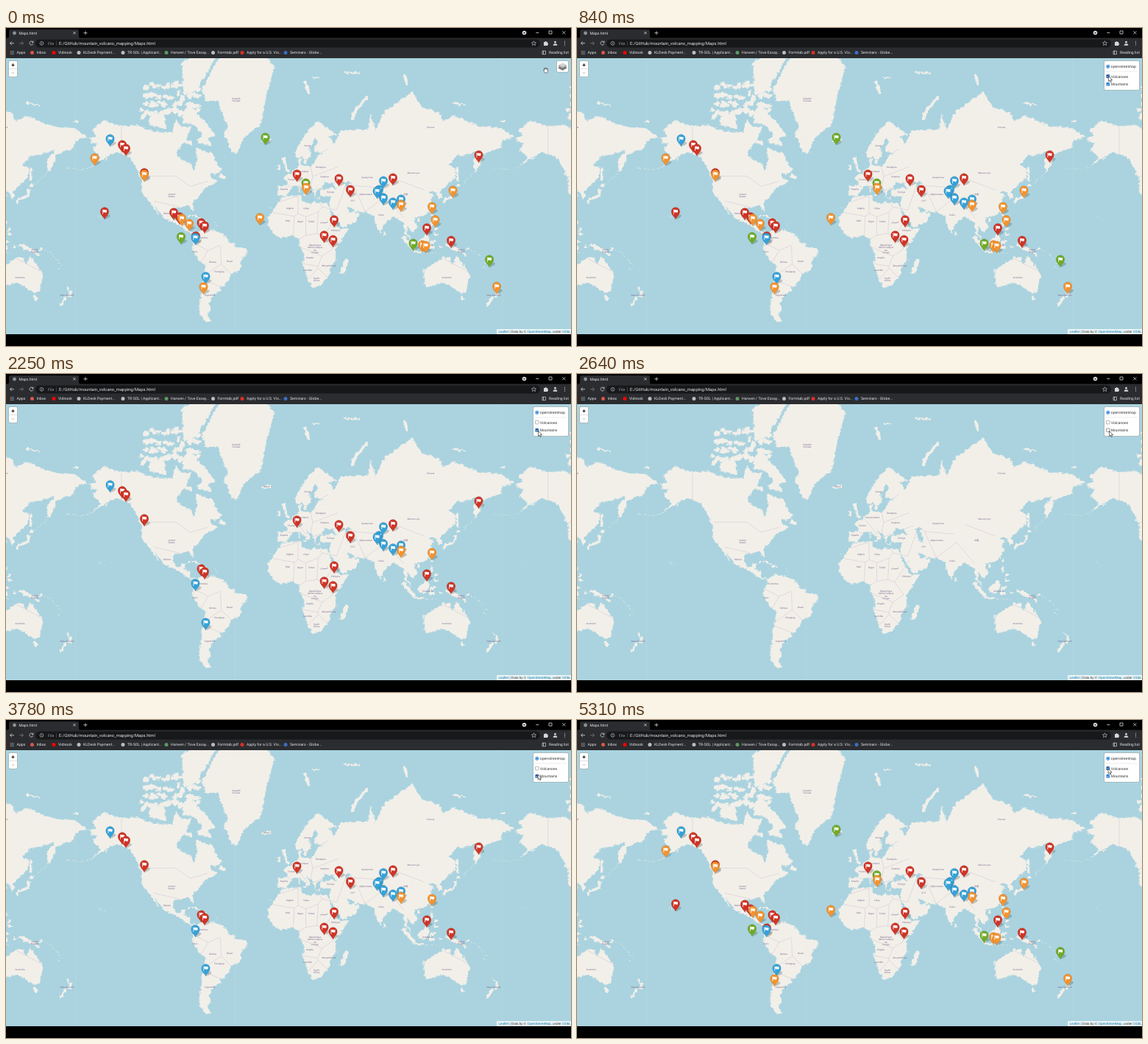
An HTML page that plays this animation: 768 by 432 pixels, repeating every 5340 ms.

```html
<!DOCTYPE html>
<html lang="en">
<head>
<meta charset="utf-8">
<title>Maps.html</title>
<style>
html, body { margin: 0; width: 100%; height: 100%; overflow: hidden; background: #000; }
svg { display: block; width: 100vw; height: 100vh; text-rendering: geometricPrecision; }
.ui { font-family: Roboto, "Noto Sans", sans-serif; font-size: 5.2px; fill: #e4e5e8; }
.map { font-family: "Liberation Sans", Arial, sans-serif; font-size: 5.1px; fill: #333; }
.place { font-family: "Noto Sans", "Noto Sans CJK SC", sans-serif; font-size: 3.1px; fill: #75648a; text-anchor: middle; }
</style>
</head>
<body>
<svg id="stage" viewBox="0 0 768 432" xmlns="http://www.w3.org/2000/svg">
<defs>
  <filter id="rough" filterUnits="userSpaceOnUse" x="0" y="41" width="768" height="375" color-interpolation-filters="sRGB">
    <feTurbulence type="fractalNoise" baseFrequency=".22" numOctaves="3" seed="4"/>
    <feDisplacementMap in="SourceGraphic" scale="5.5" xChannelSelector="R" yChannelSelector="G"/>
  </filter>
  <clipPath id="view"><path d="M0 41h768v375H0z"/></clipPath>
  <g id="lands" fill="#f2efe9" stroke="#f2efe9" stroke-width=".5" stroke-linejoin="round" stroke-linecap="round"></g>
  <mask id="onLand" maskUnits="userSpaceOnUse" x="0" y="0" width="768" height="432"><use href="#lands"/></mask>
  <path id="borders" mask="url(#onLand)" fill="none" stroke="#b9a6bd" stroke-width=".45" opacity=".75"/>
  <g id="names" class="place"></g>
  <g id="world"><use href="#borders"/><use href="#names"/></g>
  <path id="pinBody" d="M0 10.2C-1 6.6-5.8 4.6-5.8-.7A5.8 5.8 0 0 1 5.8-.7C5.8 4.6 1 6.6 0 10.2Z"/>
  <path id="flag" fill="#fff" d="M-3-3.4h.7v6.3H-3zM-2-3Q-.7-3.7.5-3T3-3.1V.3Q1.7 1 .5.4T-2 .6Z"/>
</defs>
<path fill="#aad3df" d="M0 41h768v375H0z"/>
<g clip-path="url(#view)">
  <g filter="url(#rough)"><use href="#lands" x="-580"/><use href="#lands"/><use href="#lands" x="580"/></g>
  <use href="#world" x="-580"/><use href="#world"/><use href="#world" x="580"/>
  <path d="M94.5 41V416M311 41V416M674.5 41V416" stroke="#dce8cf" stroke-width=".6" opacity=".3"/>
</g>
<g id="pins"></g>

<g class="map">
  <rect x="3.5" y="44.5" width="12" height="22" rx="2" fill="#fff" stroke="#0003"/>
  <path d="M4 55.5h11" stroke="#ccc" stroke-width=".6"/>
  <path d="M7.5 50.3h4M9.5 48.3v4" stroke="#111"/>
  <path d="M7.7 61h3.6" stroke="#bbb"/>
  <path fill="#fff" opacity=".75" d="M667 409h101v7H667z"/>
  <text x="669.5" y="414.2" font-size="4.55"><tspan fill="#0078a8">Leaflet</tspan> | Data by © <tspan fill="#0078a8">OpenStreetMap</tspan>, under <tspan fill="#0078a8">ODbL</tspan>.</text>
  <g id="layersIcon">
    <rect x="748.5" y="44.5" width="16" height="15.5" rx="2" fill="#fff" stroke="#0003"/>
    <path d="M751 53l5.5-3 5.5 3v1.7l-5.5 3-5.5-3z" fill="#777"/>
    <path d="M751 50.5l5.5-2.8 5.5 2.8v1.5l-5.5 2.8-5.5-2.8z" fill="#a5a5a5"/>
    <path d="M751 50.3l5.5-2.8 5.5 2.8-5.5 2.7z" fill="#d2d2d2"/>
  </g>
  <g id="layersPanel">
    <rect x="716.5" y="44.5" width="48" height="40" rx="2" fill="#fff" stroke="#0003"/>
    <circle cx="721.8" cy="52.3" r="2.3" fill="#fff" stroke="#1976d2" stroke-width=".7"/>
    <circle cx="721.8" cy="52.3" r="1.4" fill="#1976d2"/>
    <path d="M719 59h43" stroke="#ddd" stroke-width=".6"/>
    <text x="725.8" y="54.2">openstreetmap</text>
    <text x="725.8" y="67.7">Volcanoes</text>
    <text x="725.8" y="78.4">Mountains</text>
    <g id="boxes"></g>
  </g>
</g>

<g class="ui">
  <path fill="#000" d="M0 0h768v41H0zM0 416h768v16H0z"/>
  <path fill="#2b2c2f" d="M0 13.5h2q2 0 2-2V4q0-2 2-2H97q2 0 2 2v7.5q0 2 2 2H768V41H0z"/>
  <rect x="40" y="15.5" width="686" height="11" rx="5.5" fill="#17181a"/>
  <circle cx="11.5" cy="7" r="2.4" fill="#8d9196"/>
  <text x="17.5" y="8.8">Maps.html</text>
  <text x="57" y="22.8" fill="#9aa0a6">File</text>
  <path d="M68.5 18v6" stroke="#5f6368" stroke-width=".5"/>
  <text x="72" y="23" font-size="5.85">E:/GitHub/mountain_volcano_mapping/Maps.html</text>
  <g fill="none" stroke="#d4d6d9" stroke-width=".8">
    <path d="M91.3 5l3.4 3.4m0-3.4l-3.4 3.4M105.5 6.7h5m-2.5-2.5v5"/>
    <path d="M11 20.7H5.5m2.4-2.4l-2.4 2.4 2.4 2.4"/>
    <path d="M18 20.7h5.5m-2.4-2.4l2.4 2.4-2.4 2.4" stroke="#777b80"/>
    <path d="M36.7 19.2a2.5 2.5 0 1 0 .2 2.2M37 17.7v2h-2"/>
    <circle cx="48.5" cy="20.8" r="2.4" stroke-width=".6"/><path d="M48.5 20.4v1.8m0-3v.6" stroke-width=".6"/>
    <path d="M720.3 6.5h4M738 4h4v4h-4zM756.3 4.3l4 4m0-4l-4 4"/>
    <path d="M717.5 17.7l.9 2 2.2.2-1.7 1.4.6 2.2-2-1.2-2 1.2.6-2.2-1.7-1.4 2.2-.2z" stroke-width=".6"/>
    <path d="M729 31.2h4.5v4.5H729zM730.5 31v4.5" stroke-width=".7"/>
  </g>
  <g fill="#d4d6d9">
    <circle cx="704.5" cy="6.5" r="2.8"/><path d="M703 6l1.5 1.7L706 6z" fill="#222"/>
    <path d="M731 19h1.6a1 1 0 0 1 2 0h1.6v1.7a1 1 0 0 1 0 2V24H731z"/>
    <circle cx="746.5" cy="19.2" r="1.4"/><path d="M743.7 23.7q0-2.4 2.8-2.4t2.8 2.4z"/>
    <path d="M759.5 18.3h0m0 2.4h0m0 2.4h0" stroke="#d4d6d9" stroke-width="1.2" stroke-linecap="round"/>
  </g>
  <text x="738" y="35.4">Reading list</text>
  <g id="bookmarks"></g>
</g>
<path id="hand" fill="#fff" stroke="#222" stroke-width=".55" d="M-2.1 5.5q-2-2.4-1.2-2.8.6-.3 1.3.7l-.5-2.3q.1-.9 1 0l.4 1V.4q.5-.9 1 0l.2 1.6.5-1.4q.7-.5.8.3l-.1 1.6.6-.7q.7-.3.7.4L2 5.8l-.7 1.2h-2.6z"/>
<path id="arrow" d="M0 0V7L1.6 5.6 2.7 8 3.9 7.4 2.8 5.1H5z" fill="#fff" stroke="#111" stroke-width=".6"/>
</svg>

<script>
const $ = id => document.getElementById(id);
const add = (parent, tag, attrs, text) => {
  const el = document.createElementNS('http://www.w3.org/2000/svg', tag);
  for (const key in attrs) el.setAttribute(key, attrs[key]);
  if (text) el.textContent = text;
  return parent.appendChild(el);
};
const show = (el, on) => { el.style.display = on ? '' : 'none'; };
const points = text => text.trim().split(/\s+/).map(pair => pair.split(',').map(Number));

let seed = 7;
const random = () => (seed = seed * 16807 % 2147483647) / 2147483647;

// Web Mercator
const project = ([lon, lat]) => [
  384 + lon * 580 / 360,
  292 - 92.3 * Math.log(Math.tan(Math.PI / 4 + lat * Math.PI / 360))
];
const trace = text => 'M' + points(text).map(project).join('L');
const land = (text, fill = '#f2efe9') => add($('lands'), 'path', { d: trace(text) + 'Z', fill, stroke: fill });
// Long islands are thick strokes; the rough filter frays their coasts
const strip = (width, ...lines) => lines.forEach(text =>
  add($('lands'), 'path', { d: trace(text), fill: 'none', 'stroke-width': width }));
const chain = (...lines) => lines.forEach(text =>
  add($('lands'), 'path', { d: trace(text), fill: 'none', 'stroke-width': 1, 'stroke-dasharray': '.6 3' }));

// North America
land(`-168,66 -162,66.5 -166,68.5 -156,71.3 -141,69.6 -128,70 -115,68 -98,67.8 -95,71.8 -91,69.5 -82,69.5 -86,65.5 -94,61
 -94,58.7 -82.3,55 -80,51.5 -77,56.5 -78,62.4 -70,60.5 -64.5,60.3 -60,55 -56,52.5 -60,50.2 -66,50 -65,48 -60,46 -66,43.6
 -70.5,42 -76,36 -81,31.8 -80,25.5 -84,30 -90,29.3 -97,28 -97.6,22 -95,18.3 -91,18.8 -89,21.4 -87,21 -88.3,15.8 -83.3,15
 -82,9.3 -77,8 -83,8.3 -92,14.5 -105.5,20.5 -114,31.7 -109.5,23 -117,32.5 -124,40 -124,48.5 -134,58.5 -146,60.7
 -153,58.8 -164.5,54.7 -158,58.3 -165,61.5 -161,64.2 -166.5,64.6`);
land(`-66,80.5 -60,82.3 -45,83.3 -25,83.5 -12,81.5 -19,77 -22,72 -24,70.3 -38,65.8 -43.5,60 -48,61 -54,67.2 -51,69.5
 -55,72.5 -60,76 -70,76 -73,78.2`);
land('-89,73.6 -80,73.7 -71,71.2 -62,66.8 -68,66 -65,63 -77,64.5 -73,67 -79,70 -89,70.5');
land('-117,70 -103,68.7 -105,72.8 -114,73 -118.5,71.5');
land('-88,77 -77,78 -62,82.4 -70,83.1 -90,82');
for (let lon = -124; lon < -78; lon += 4) for (let lat = 73; lat < 79; lat += 1.7) {
  const [x, y] = project([lon + 5 * random(), lat + random()]);
  add($('lands'), 'ellipse', { cx: x, cy: y, rx: 2 + 4 * random(), ry: 1.5 + 3 * random() });
}
strip(5, '-123,72 -120,73.5', '-57,49 -55,48.3', '-86,64.5 -83,64.2');
strip(1.8, '-84,22.3 -79,22.3 -75,20.4', '-127,50 -124,48.7', '-154,57 -153,58');
strip(3, '-73,19 -69.5,18.6');

// South America
land(`-77.5,8 -72,12 -62,10.7 -52,5 -50,.5 -44.5,-2.5 -35.3,-5.5 -35,-9 -39,-13 -41,-22 -48.6,-26 -54,-34 -58,-34.5
 -57,-37 -65,-41 -67,-46 -65.8,-48 -69,-52 -65.2,-54.8 -69,-55.3 -74,-52.5 -75.3,-47 -73.5,-38 -70.3,-19 -76,-14
 -81,-6 -80,.8 -77.5,4`);

// Africa
land(`-6,35.8 10,37.2 10.5,34 19,30.5 20,32.8 32.4,31.2 37.2,21 43.2,12 51,11.8 42,-1.5 39,-6 40.6,-15 35,-20 35.4,-24
 32.5,-28.5 26,-34 20,-34.8 18.2,-33 11.8,-17 13.7,-11 9,-1 9.7,3.8 4.5,6.3 -7.7,4.4 -13,8.5 -17.3,15 -17,21.5 -9.8,30`);
strip(6, '49,-15 45.5,-23.5');

// Europe
land(`-9,43 -1.8,43.4 -1.2,46 -4.6,48.4 1.5,50.3 8.5,53.7 8.2,57 10.6,57.6 10.8,54.2 19,54.4 24,57.2 23.6,59.2 30,60
 21.5,61 25,65 22,65.8 17.3,61.8 18.8,60 14.3,55.5 11.5,58.5 7,58 5,60 12,65.5 17,68.8 25,71 41,67 34,66.6 38,64 46,66
 46,46 34,44.6 30.5,46 28,41.5 23,40.3 22.8,36.5 19.5,42 13.7,45.2 18.4,40 16,38 10.3,43.5 3.5,43.3 -2,36.8 -9,37`);
strip(4, '-4,57.7 -3,55.5 -1.5,53 0,51.8', '-8,54.2 -8,52.7', '-22,64.7 -16,65');
strip(2, '13,37.5 15,37.5', '9,41 9,39.4', '24,35.2 26,35.2', '9,42.7 9,41.9');
strip(4, '54,71.7 57,74 66,76.5', '14,79.3 17,77.5', '98,80.3 100,79');
strip(2, '20,80 26,80', '47,80.7 60,80.7', '139,75.5 149,75', '179,71 182,71');

// Asia
land(`40,64.8 44,68.4 67,68.5 69.5,73 73,68 81,73.5 104,77.6 113,74.5 127,73.2 130,71 140,72.5 160,69.7 180,69 190,66.2
 180,65 179,62.4 163.5,59.5 163,56 157,51 156,57 163,61.5 150,59.5 142,59 135.2,54.6 141,53 140,48 127.5,39.7 129.4,36.5
 126.5,34.5 125,38 121.5,40.5 118,39 122.4,37.2 119.3,35 121.8,31 118,24.5 113.5,22.3 108.3,21.5 85,28 60,30 40,44 38,47`);
land(`27,40.3 35,42 41.5,41.6 37.5,44.7 60,48 110,40 106,19 109,13 105,9 100.5,13.4 99.3,10.5 103.6,1.4 98.5,8 97,17
 89,22 80.2,15.5 77.5,8.1 73,17 72.7,21.5 67,24.8 57.5,25.6 49,30 52,24 56,26 59.8,22.4 55,17 45,12.8 35,28.2 34.3,31.3
 36,36.5 27.3,37`);
land('47,45.5 53,45.5 51,44 54,37.2 49.5,37.5 49.3,40.5', '#aad3df');
strip(3.2, '131,32.5 132,34.5 138,36 140.7,38 141,41', '142,43.2 144,43.3', '142.5,47 142.5,53');
strip(3, '121,23 121,24.5', '80.8,8.7 80.8,7', '109.7,19.2 110,19', '121,18 121,15', '123.5,7.5 125.7,7', '124,11 125,12');
strip(5, '96.5,4.5 102,-1 105,-5', '134,-2 140,-4.5 145,-7');
strip(2.8, '106,-7 114,-8', '120,.3 120,-5', '120,.5 124,1', '120.5,-2 122.5,-4.5', '145,-7 149.5,-10');
land('109,1.5 111.5,2.5 117,7 119,5.2 117.5,1 116,-4 110.2,-3');

// Oceania
land(`114,-22 122,-18 131,-12 137,-12.2 135.7,-15 139.5,-17.5 142,-10.7 145.3,-15 149,-20.3 153,-25.5 150,-37.4
 146.3,-39 138,-35 131.5,-31.5 119,-34.3 115.2,-34.2`);
strip(4, '146,-41.5 147,-42.5', '176,-38 175.5,-40.5', '172,-42 168,-46');
strip(1.7, '173,-35 175.5,-37.5', '149,-5.7 152,-4.5', '128,-3 130,-3.3');
chain('195,54 188,52.5 172,53', '146,44 156,50.5', '115,-8.5 127,-8.5', '-61.5,17 -61,12', '-160,22 -155.5,19.5',
  '155,-6 161,-10 169,-19', '164,-20 167,-22', '-18,28.2 -14,28.6');

// Country labels also seed the borders: each country is the area nearest its label
const labels = `Kalaallit_Nunaat 313,97|Россия 577,136|United_States 225,227|México 219,253|Colombia 267,286|Brasil 304,318
 |Perú 257,305|Bolivia 281,319|Paraguay 290,332|Argentina 277,364|Algérie 386,246|Mali 383,263|Niger 400,264|Tchad 415,264
 |السودان 432,265|République_démocratique_du_Congo 420,296|Angola 413,313|Namibia 410,330|South_Africa 422,341
 |Moçambique 439,324|Қазақстан 491,204|Монгол_улс 554,198|中国 543,227|India 510,255|Australia 599,340|New_Zealand 663,364
 |Papua_Niugini 619,302|France 388,207|España 378,220|Deutschland 402,196|Україна 433,203|Беларусь 428,190|Türkiye 441,224
 |Norge 410,161|Ísland 354,154|Indonesia 573,296|ایران 471,235|Afghanistan 489,227|Ethiopia 448,276|Libya 408,246`;
const seats = labels.split('|').map(entry => {
  const [name, spot] = entry.trim().split(' ');
  const [x, y] = spot.split(',').map(Number);
  const lines = name.length > 11 ? name.split('_') : [name.replace('_', ' ')];
  lines.forEach((line, i) => add($('names'), 'text', { x, y: y + 3.4 * i }, line));
  return { x, y };
});
const borderBetween = (a, b) => {
  const dx = b.x - a.x, dy = b.y - a.y, length = Math.hypot(dx, dy);
  if (length > 46) return '';
  const mx = (a.x + b.x) / 2, my = (a.y + b.y) / 2, ux = -dy / length, uy = dx / length;
  let from = -22, to = 22;
  for (const c of seats) if (c !== a && c !== b) {
    const ex = c.x - a.x, ey = c.y - a.y;
    const slope = ux * ex + uy * ey;
    const limit = ((ex * ex + ey * ey) / 2 - (mx - a.x) * ex - (my - a.y) * ey) / slope;
    if (slope > 0) to = Math.min(to, limit);
    else from = Math.max(from, limit);
  }
  return from < to ? `M${mx + from * ux} ${my + from * uy}L${mx + to * ux} ${my + to * uy}` : '';
};
$('borders').setAttribute('d', trace('-141,69.6 -141,60 -131,55') + trace('-123,49 -95,49 -83,43 -68,46')
  + seats.map((a, i) => seats.slice(i + 1).map(b => borderBetween(a, b)).join('')).join(''));

const colors = { red: '#cf3527', blue: '#36a2d8', green: '#6fab27', orange: '#f2932f' };
const markers = [];
const pins = (layer, color, spots) => points(spots).forEach(([x, y]) => markers.push({ layer, color, x, y }));
pins('mountains', 'blue', '141.5,151 513,208 507,220 504.5,222 513,231 526,237 537,233 257.5,285 271.5,338');
pins('mountains', 'red', `158,159 163,164 188,197 395.5,199 452.5,205 526,204 468,220 446,261 432.5,282 444.5,288
 642.5,173 572,272 605,289 265.5,265 270,269`);
pins('mountains', 'orange', '579,243 537,240');
pins('volcanoes', 'green', '352.5,149 407.5,211 238,284 553.5,293 657,315');
pins('volcanoes', 'orange', `120.5,177 188,199 408,217 345,258 239,259 249,266 607.5,221 583.5,261 566,295 570.5,296
 667,351.5 268.5,352`);
pins('volcanoes', 'red', '134,250 228,251 236,257 258,283');
markers.sort((a, b) => a.y - b.y);
for (const m of markers) {
  m.el = add($('pins'), 'g', { transform: `translate(${m.x} ${m.y})` });
  add(m.el, 'path', { d: 'M0 10L4 4Q7.5 3 8 5Q7 8 0 10Z', fill: '#2a3a40', opacity: .25 });
  add(m.el, 'use', { href: '#pinBody', fill: colors[m.color], stroke: '#0003', 'stroke-width': .5 });
  add(m.el, 'use', { href: '#flag' });
}

const checkbox = y => {
  const box = add($('boxes'), 'rect', { x: 719.5, y: y - 2.3, width: 4.6, height: 4.6, rx: .7, 'stroke-width': .6 });
  const tick = add($('boxes'), 'path', { d: `M720.5 ${y}l1 1.1 1.8-2.2`, fill: 'none', stroke: '#fff', 'stroke-width': .8 });
  return (on, hover) => {
    box.setAttribute('fill', on ? (hover ? '#1156a0' : '#1976d2') : '#fff');
    box.setAttribute('stroke', on ? 'none' : hover ? '#555' : '#888');
    show(tick, on);
  };
};
const setVolcanoes = checkbox(65.6), setMountains = checkbox(76.3);

const bookmark = (x, fill, label) => {
  add($('bookmarks'), 'circle', { cx: x - 6, cy: 33.5, r: 2.5, fill });
  add($('bookmarks'), 'text', { x, y: 35.4 }, label);
};
bookmark(41.5, '#d9574b', 'Inbox');
bookmark(71, '#f00', 'Vidnook');
bookmark(105, '#b9bcc0', 'KLDesk Payment...');
bookmark(165, '#b9bcc0', 'TR-SOL | Applicant...');
bookmark(224, '#5c9a62', 'Harwen / Tove Essay...');
bookmark(287.5, '#b9bcc0', 'Formtab.pdf');
bookmark(327, '#d93025', 'Apply for a U.S. Vis...');
bookmark(386, '#3b6fc4', 'Seminars - Globe...');
add($('bookmarks'), 'text', { x: 14.5, y: 35.4 }, 'Apps');
for (let i = 0; i < 9; i++)
  add($('bookmarks'), 'rect', { x: 5.8 + i % 3 * 1.9, y: 31 + Math.floor(i / 3) * 1.9, width: 1.3, height: 1.3, fill: ['#e8594b', '#58a55c', '#4a8af4'][i % 3] });

const ease = (t, from, to) => {
  const u = Math.min(1, Math.max(0, (t - from) / (to - from)));
  return u * u * (3 - 2 * u);
};
// Cursor moves: start, end, target x, target y
const moves = [[200, 420, 750, 53], [450, 780, 722.6, 65.5], [1600, 2050, 723.6, 77.5], [3650, 4000, 722, 66]];
const cursorAt = t => moves.reduce(([x, y], [from, to, nx, ny]) => {
  const u = ease(t, from, to);
  return [x + (nx - x) * u, y + (ny - y) * u];
}, [734, 54]);

function draw(t) {
  const open = t >= 400;
  const visible = { volcanoes: t < 1150 || t >= 4150, mountains: t < 2600 || t >= 3450 };
  const [x, y] = cursorAt(t);
  show($('layersIcon'), !open);
  show($('layersPanel'), open);
  setVolcanoes(visible.volcanoes, open && x < 727 && y < 71);
  setMountains(visible.mountains, y > 72);
  markers.forEach(m => show(m.el, visible[m.layer]));
  show($('hand'), !open);
  show($('arrow'), open);
  for (const id of ['hand', 'arrow']) $(id).setAttribute('transform', `translate(${x} ${y})`);
}

const start = performance.now();
function tick() {
  draw((performance.now() - start) % 5340);
  requestAnimationFrame(tick);
}
tick();
</script>
</body>
</html>
```
